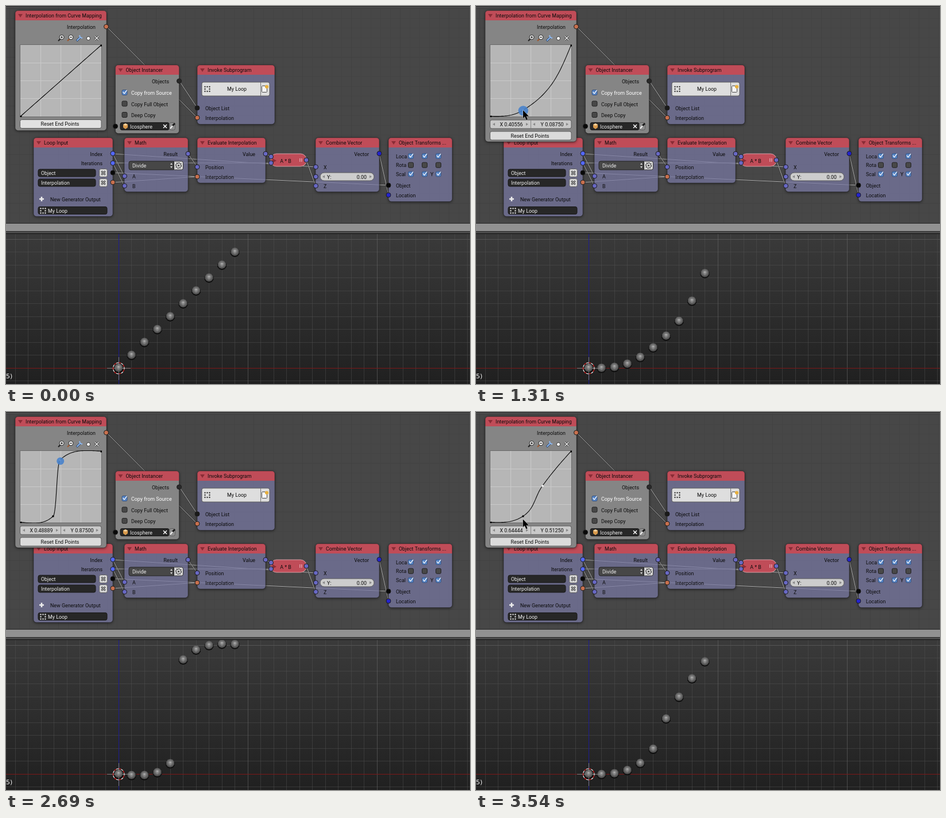
An HTML page with a canvas for the animation above (3580 ms loop, 808 by 660 pixels).

```html
<!DOCTYPE html>
<html lang="en">
<head>
<meta charset="utf-8">
<title>Curve driven loop</title>
<style>
html, body { margin: 0; width: 100%; height: 100%; overflow: hidden; background: #464646; }
canvas { display: block; width: 808px; height: 660px; }
</style>
</head>
<body>
<canvas id="stage" width="808" height="660"></canvas>
<script>
const ctx = document.getElementById('stage').getContext('2d');
const LOOP = 3580;
const FONT = '8.9px Roboto, sans-serif';
const RED = '#c04c58', GREY = '#858585', VIOLET = 'rgba(121,121,165,0.7)';
const ORANGE = '#c8704e', BLUE = '#5468fa', LILAC = '#6868c4', NAVY = '#2424cc', BLACK = '#080808';

// ---------- drawing helpers ----------
function text(s, x, y, color = '#0c0c0c', align = 'left', font = FONT) {
  ctx.font = font;
  ctx.textAlign = align;
  ctx.textBaseline = 'middle';
  ctx.fillStyle = color;
  ctx.fillText(s, x, y + 0.5);
}
function rect(x, y, w, h, color) {
  ctx.fillStyle = color;
  ctx.fillRect(x, y, w, h);
}
function box(x, y, w, h, r, fill, stroke) {
  ctx.beginPath();
  ctx.roundRect(x, y, w, h, r);
  if (fill) { ctx.fillStyle = fill; ctx.fill(); }
  if (stroke) { ctx.strokeStyle = stroke; ctx.lineWidth = 1; ctx.stroke(); }
}
function line(points, color, width = 1) {
  ctx.beginPath();
  points.forEach(([x, y]) => ctx.lineTo(x, y));
  ctx.strokeStyle = color;
  ctx.lineWidth = width;
  ctx.stroke();
}
function poly(points, color) {
  ctx.beginPath();
  points.forEach(([x, y]) => ctx.lineTo(x, y));
  ctx.closePath();
  ctx.fillStyle = color;
  ctx.fill();
}
function disc(x, y, r, fill, stroke) {
  ctx.beginPath();
  ctx.arc(x, y, r, 0, 7);
  ctx.fillStyle = fill;
  ctx.fill();
  if (stroke) { ctx.strokeStyle = stroke; ctx.lineWidth = 1; ctx.stroke(); }
}
function cross(x, y, r, color, width = 1.3) {
  line([[x - r, y - r], [x + r, y + r]], color, width);
  line([[x - r, y + r], [x + r, y - r]], color, width);
}
const socket = (x, y, color) => disc(x, y, 4, color, '#1c1c1c');
const arrow = (x, y, dir) => poly([[x - 2 * dir, y - 2.5], [x + 2 * dir, y], [x - 2 * dir, y + 2.5]], '#888');
const darkField = (x, y, w, h) => box(x, y, w, h, 3, '#272727', '#191919');
const lightField = (x, y, w, h, fill = '#dcdcdc') => box(x, y, w, h, 3, fill, '#5c5c5c');

function node(x, y, w, h, body, title) {
  // The shadow stays outside, so translucent bodies keep their colour.
  ctx.save();
  ctx.beginPath();
  ctx.rect(0, 0, 808, 380);
  ctx.roundRect(x, y, w, h, 5);
  ctx.clip('evenodd');
  ctx.shadowColor = 'rgba(0,0,0,0.6)';
  ctx.shadowBlur = 5;
  ctx.shadowOffsetY = 1;
  box(x, y, w, h, 5, '#000');
  ctx.restore();
  box(x, y, w, h, 5, body);
  box(x, y, w, 17, [5, 5, 0, 0], RED);
  box(x, y, w, h, 5, null, 'rgba(30,30,30,0.45)');
  poly([[x + 5, y + 6], [x + 13, y + 6], [x + 9, y + 12]], '#8a2c36');
  text(title, x + 18, y + 8.5);
}
function check(x, y, on) {
  box(x - 4.5, y - 4.5, 9, 9, 2, on ? '#5583c4' : '#484848', on ? '#38547f' : '#222');
  if (on) line([[x - 3, y - 1], [x - 0.5, y + 2], [x + 4, y - 4]], '#f0f4fa', 1.3);
}
function dots(x, y, color) {
  for (let i = 0; i < 9; i++) {
    if (i !== 4) disc(x - 4 + (i % 3) * 4, y - 4 + Math.floor(i / 3) * 4, 1.2, color);
  }
}

// ---------- timing ----------
const clamp = v => Math.min(1, Math.max(0, v));
const tick = (t, start) => start + Math.floor((t - start) / 40) * 40;
const mix = (a, b, u) => [a[0] + (b[0] - a[0]) * u, a[1] + (b[1] - a[1]) * u];
const snap = ([x, y]) => [Math.round(x * 180) / 180, Math.round(y * 160) / 160];
function ease(t, from, to) {
  const u = clamp((t - from) / (to - from));
  return u * u * (3 - 2 * u);
}

const LOW = [73 / 180, 14 / 160], HIGH = [87 / 180, 142 / 160], LEAD = 28;
function dragLow(t) { return mix([0.3167, 0.3167], LOW, ease(t, 640, 1120)); }
function dragUp(t) {
  const u = ease(t, 1900, 2440), bend = [0.575, 0.53];
  return mix(mix([0.767, 0.5], bend, u), mix(bend, HIGH, u), u);
}
function dragBack(t) { return mix(HIGH, [116 / 180, 81 / 160], ease(t, 2630, 3180)); }

function pose(t) {
  const s = { points: [[0, 0]], press: null, cursor: null };
  const press = (p, k = 0) => {
    s.press = { x: px(p[0]), y: py(p[1]), r: k ? 6.5 + 2.2 * k : 6.5, alpha: 0.88 * (1 - Math.max(0, k - 1) / 3) };
  };
  const release = (p, start) => {
    const k = Math.floor((t - start) / 40) + 1;
    if (k <= 3) press(p, k);
  };
  if (t >= 640) {
    const now = tick(t, 640);
    s.points.push(snap(dragLow(now)));
    if (t < 1310) press(dragLow(now + LEAD));
    else if (t < 1970) {
      release([LOW[0], 0.078], 1310);
      s.cursor = mix([82, 182], [133, 130], ease(tick(t, 1310), 1310, 1830));
    }
  }
  if (t >= 1970) {
    const drag = t < 2690 ? dragUp : dragBack;
    const now = tick(t, t < 2690 ? 1970 : 2690);
    if (t < 3220) {
      s.points.push(snap(drag(now)));
      press(drag(now + LEAD));
    } else {
      const end = [116 / 180, 82 / 160];
      s.points.push(end);
      release(end, 3220);
      s.cursor = mix([116, 128], [72, 204], ease(tick(t, 3220), 3220, 3680));
    }
  }
  s.points.push([1, 1]);
  return s;
}

// ---------- curve with automatic handles ----------
const px = v => 25.5 + 140 * v, py = v => 192.5 - 124 * v;
const sub = (a, b) => [a[0] - b[0], a[1] - b[1]];
const unit = v => { const l = Math.hypot(...v) || 1; return [v[0] / l, v[1] / l]; };
const along = (p, d, l) => [p[0] + d[0] * l, p[1] + d[1] * l];
const HANDLE = 2.5614;

function buildCurve(p) {
  const last = p.length - 1;
  const gap = i => Math.hypot(...sub(p[i + 1], p[i])) / HANDLE;
  const dir = p.map((q, i) => {
    const a = unit(sub(q, p[i - 1] || [0, 0])), b = unit(sub(p[i + 1] || [0, 0], q));
    return i === 0 ? b : i === last ? a : unit([a[0] + b[0], a[1] + b[1]]);
  });
  const before = p.map((q, i) => i ? along(q, dir[i], -gap(i - 1)) : q);
  const after = p.map((q, i) => i < last ? along(q, dir[i], gap(i)) : q);
  if (last > 1) {
    const a = [Math.max(0, before[1][0]), before[1][1]];
    const b = [Math.min(1, after[last - 1][0]), after[last - 1][1]];
    after[0] = along(p[0], unit(sub(a, p[0])), gap(0));
    before[last] = along(p[last], unit(sub(b, p[last])), gap(last - 1));
  }
  const out = [];
  for (let i = 0; i < last; i++) {
    const v1 = p[i], v4 = p[i + 1];
    const reach = Math.abs(after[i][0] - v1[0]) + Math.abs(v4[0] - before[i + 1][0]);
    const fit = Math.min(1, (v4[0] - v1[0]) / (reach || 1));
    const v2 = mix(v1, after[i], fit), v3 = mix(v4, before[i + 1], fit);
    for (let k = 0; k <= 32; k++) {
      const u = k / 32, m = mix(v2, v3, u);
      out.push(mix(mix(mix(v1, v2, u), m, u), mix(m, mix(v3, v4, u), u), u));
    }
  }
  return out;
}
function sample(curve, x) {
  const i = curve.findIndex(q => q[0] >= x);
  if (i < 1) return curve[0][1];
  const a = curve[i - 1], b = curve[i];
  return a[1] + (b[1] - a[1]) * (x - a[0]) / (b[0] - a[0] || 1);
}

// ---------- node editor ----------
function drawBackdrop() {
  rect(0, 0, 808, 380, '#474747');
  for (let i = 0; i < 48; i++) {
    const color = i % 5 ? '#444444' : '#414141';
    rect(6 + i * 17, 0, 1, 380, color);
    rect(0, 4 + i * 17, 808, 1, color);
  }
  rect(0, 0, 808, 1, '#202020');
  rect(0, 1, 808, 1, '#525252');
}
function drawLinks() {
  const link = (...c) => {
    const ends = [[c[0], c[1]], [c[2], c[3]]];
    line(ends, 'rgba(30,30,30,0.5)', 2.2);
    line(ends, '#b2b2b2', 1);
  };
  link(175, 36, 333, 195);
  link(302, 131, 333, 178);
  link(186, 258, 206, 297);
  link(186, 258, 539, 281);
  link(186, 274, 206, 314);
  link(186, 274, 461, 274);
  link(186, 291, 666, 313);
  link(186, 308, 333, 298);
  link(317, 258, 333, 281);
  link(452, 258, 461, 263);
  link(523, 269, 539, 314);
  link(650, 258, 666, 330);
}
function drawInstancer() {
  node(190.5, 103, 111, 119.5, GREY, 'Object Instancer');
  text('Objects', 284, 132, undefined, 'right');
  socket(301.5, 131, '#2a2a2a');
  ['Copy from Source', 'Copy Full Object', 'Deep Copy'].forEach((s, i) => {
    check(206.5, 151 + i * 19.5, i === 0);
    text(s, 218, 152 + i * 19.5, i ? undefined : '#fff');
  });
  darkField(199, 203.5, 85, 13);
  poly([[208, 205], [212, 207], [212, 212], [208, 215], [204, 212], [204, 207]], '#d99a4c');
  poly([[208, 205], [212, 207], [208, 209], [204, 207]], '#f4d3a0');
  text('Icosphere', 216, 210.5, '#eee');
  cross(277, 210, 3, '#fff', 1.5);
  lightField(284.5, 203.5, 10, 13, '#8e8e8e');
  line([[286, 214], [291, 208]], '#eee', 2);
  line([[290, 209], [294, 205]], '#181818', 3);
  socket(190.5, 210, BLACK);
}
function drawSubprogram() {
  node(333, 103, 135, 103.5, VIOLET, 'Invoke Subprogram');
  lightField(341, 133, 118, 24, '#dedede');
  line([[443.5, 133], [443.5, 157]], '#777');
  dots(350.5, 145, '#333');
  text('My Loop', 402, 145, undefined, 'center');
  box(445.5, 139.5, 9, 11, 1, '#f6f6f6', '#444');
  disc(454, 141, 3, '#e8b03c');
  text('Object List', 347, 179);
  text('Interpolation', 347, 196);
  socket(333, 178, '#1a1a1a');
  socket(333, 195, ORANGE);
}
function drawLoopInput() {
  node(48, 230, 138, 137.5, VIOLET, 'Loop Input');
  text('Index', 168, 259, undefined, 'right');
  text('Iterations', 168, 275, undefined, 'right');
  ['Object', 'Interpolation'].forEach((s, i) => {
    const y = 291.5 + i * 17;
    darkField(56, y - 6.5, 100, 13);
    text(s, 61, y + 0.5, '#eee');
    lightField(162.5, y - 7, 14, 14, '#d6d6d6');
    cross(169.5, y, 3.2, '#222', 2.6);
    cross(169.5, y, 3, '#fff', 1);
  });
  line([[58, 337], [66, 337]], '#eee', 2.5);
  line([[62, 333], [62, 341]], '#eee', 2.5);
  text('New Generator Output', 77, 338);
  darkField(56, 350.5, 120, 13);
  dots(64.5, 357.5, '#ddd');
  text('My Loop', 73, 358, '#eee');
  [BLUE, BLUE, BLACK, ORANGE].forEach((c, i) => socket(186, 257.5 + i * 16.8, c));
}
function drawMath() {
  node(206, 230, 111, 94.5, VIOLET, 'Math');
  text('Result', 299, 259, undefined, 'right');
  box(214, 271, 78, 15, [3, 0, 0, 3], '#474747', '#222');
  text('Divide', 220, 279, '#f0f0f0');
  poly([[286, 277], [290, 277], [288, 274]], '#ddd');
  poly([[286, 280], [290, 280], [288, 283]], '#ddd');
  box(292.5, 271, 16, 15, [0, 3, 3, 0], '#d6d6d6', '#333');
  ctx.setLineDash([2, 1.4]);
  ctx.beginPath();
  ctx.arc(300.5, 278.5, 4.5, 0, 7);
  ctx.strokeStyle = '#333';
  ctx.lineWidth = 2;
  ctx.stroke();
  ctx.setLineDash([]);
  disc(300.5, 278.5, 1.6, '#444');
  text('A', 220, 298);
  text('B', 220, 315);
  socket(317, 258, LILAC);
  socket(206.5, 297, LILAC);
  socket(206.5, 314, LILAC);
}
function drawEvaluate() {
  node(333, 230, 119, 79, VIOLET, 'Evaluate Interpolation');
  text('Value', 434, 259, undefined, 'right');
  text('Position', 347, 282);
  text('Interpolation', 347, 299);
  socket(452, 258, LILAC);
  socket(333, 281, LILAC);
  socket(333, 298, ORANGE);
}
function drawProduct() {
  box(461, 258, 62, 22, 10, RED, '#d8a0a6');
  poly([[464, 266], [464, 274], [471, 270]], '#8a2c36');
  text('A * B', 487, 270.5, undefined, 'center');
  rect(511, 266, 1.5, 6, '#e09aa2');
  rect(514, 266, 1.5, 6, '#e09aa2');
  socket(461.5, 263, LILAC);
  socket(461.5, 274, LILAC);
  socket(523, 269, LILAC);
}
function drawCombine() {
  node(539, 230, 111, 94.5, VIOLET, 'Combine Vector');
  text('Vector', 632, 259, undefined, 'right');
  text('X', 553, 282);
  box(547, 291, 94, 14, 7, '#cdcdcd', '#5c5c5c');
  arrow(553, 298, -1);
  arrow(635, 298, 1);
  text('Y:', 559, 298.5);
  text('0.00', 628, 298.5, undefined, 'right');
  text('Z', 553, 315);
  socket(650, 257.5, NAVY);
  [281, 298, 314].forEach(y => socket(539.5, y, LILAC));
}
function drawTransforms() {
  node(666, 230, 111, 111.5, VIOLET, 'Object Transforms ...');
  ['Loca', 'Rota', 'Scal'].forEach((s, row) => {
    const y = 262 + row * 15.7;
    text(s, 679, y + 0.5);
    [705, 729, 753].forEach(x => check(x, y, row !== 1));
  });
  text('Y', 739, 294);
  text('Object', 679, 314);
  text('Location', 679, 331);
  socket(666, 313, BLACK);
  socket(666, 330, NAVY);
}
function drawCurveNode(t, state, curve) {
  const open = state.points.length > 2;
  node(16, 8, 159, open ? 229 : 209.5, GREY, 'Interpolation from Curve Mapping');
  text('Interpolation', 156, 37, undefined, 'right');
  socket(174.5, 36, ORANGE);

  [96, 112].forEach((x, i) => {
    line([[x - 1, 57], [x - 5, 61]], i ? '#a05a30' : '#222', 2.2);
    disc(x + 1, 54.5, 4, '#eee', '#222');
    line([[x - 1, 54.5], [x + 3, 54.5]], '#222', 1.2);
    if (!i) line([[x + 1, 52.5], [x + 1, 56.5]], '#222', 1.2);
  });
  line([[123, 61], [130, 54]], '#22406c', 3.6);
  line([[123.5, 60.5], [130, 54]], '#8fb8ee', 2);
  line([[128, 51], [129, 55], [133, 56]], '#8fb8ee', 2);
  disc(143.5, 56.5, 3.2, '#f2f2f2', '#333');
  cross(158, 56, 3.5, '#222', 3);
  cross(158, 56, 3.5, '#f4f4f4', 1.4);

  rect(25, 68, 141, 125, '#b6b6b6');
  for (let i = 1; i < 4; i++) {
    rect(25 + i * 35, 68, 1, 125, '#cacaca');
    rect(25, 68 + i * 31, 141, 1, '#cacaca');
  }
  box(24.5, 67.5, 142, 126, 0, null, '#6a6a6a');
  ctx.save();
  ctx.beginPath();
  ctx.rect(24, 67, 143, 127);
  ctx.clip();
  line(curve.map(([x, y]) => [px(x), py(y)]), '#050505', 1.1);
  state.points.forEach(([x, y], i) => {
    const active = open && i === state.points.length - 2;
    rect(Math.round(px(x)) - 1.5, Math.round(py(y)) - 1.5, 3, 3, active ? '#fff' : '#000');
  });
  ctx.restore();

  if (open) {
    const [x, y] = state.points[state.points.length - 2];
    lightField(24.5, 199, 141.5, 15, '#c9c9c9');
    line([[95.5, 199], [95.5, 214]], '#858585');
    [[31, -1], [89, 1], [101, -1], [159, 1]].forEach(([ax, d]) => arrow(ax, 206.5, d));
    text('X ' + x.toFixed(5), 61.5, 206.5, undefined, 'center');
    text('Y ' + y.toFixed(5), 132.5, 206.5, undefined, 'center');
  }
  const top = open ? 219 : 198.5;
  lightField(24.5, top, 141.5, 15, t < 230 ? '#e1e1e1' : t < 270 ? '#dedede' : '#dbdbdb');
  text('Reset End Points', 94, top + 7.5, undefined, 'center');
}
function drawPointer({ press, cursor }) {
  if (press) {
    ctx.globalAlpha = press.alpha;
    disc(press.x, press.y, press.r, '#4681cc');
    ctx.globalAlpha = 1;
  }
  if (cursor) {
    const shape = [[0, 0], [0, 14], [3, 11], [5.5, 17], [8, 16], [5.5, 10.5], [10, 10.5]]
      .map(([x, y]) => [cursor[0] + x, cursor[1] + y]);
    line([...shape, shape[0]], 'rgba(240,240,240,0.7)', 1);
    poly(shape, '#000');
  }
}

// ---------- 3D view ----------
function drawBall(x, y) {
  const ring = (r, dx = 0, dy = 0) => Array.from({ length: 10 }, (_, i) => {
    const a = i * Math.PI / 5 + Math.PI / 10;
    return [x + dx + r * Math.cos(a), y + dy + r * Math.sin(a)];
  });
  poly(ring(8.3, 0, 0.6), '#0c0c0c');
  const shade = ctx.createRadialGradient(x, y - 2, 1, x, y - 1, 8.5);
  shade.addColorStop(0, '#8c8c8c');
  shade.addColorStop(0.55, '#646464');
  shade.addColorStop(1, '#3c3c3c');
  poly(ring(7.5, 0, -0.5), shade);
  poly([[x - 4, y - 3], [x + 4, y - 3], [x, y + 4]], 'rgba(150,150,150,0.45)');
  poly([[x - 1.5, y - 3], [x + 1.5, y - 3], [x, y]], '#b4b4b4');
}
function drawView(curve) {
  rect(0, 379, 808, 1, '#2a2a2a');
  rect(0, 380, 808, 13, '#919191');
  rect(0, 393, 808, 1, '#2c2c2c');
  rect(0, 394, 808, 3, '#4c4c4c');
  rect(0, 397, 808, 1, '#101010');
  const shade = ctx.createLinearGradient(0, 398, 0, 660);
  shade.addColorStop(0, '#3a3a3a');
  shade.addColorStop(1, '#202020');
  rect(0, 398, 808, 262, shade);

  ctx.save();
  ctx.beginPath();
  ctx.rect(0, 398, 808, 262);
  ctx.clip();
  for (let i = -10; i < 30; i++) {
    const color = i % 10 ? 'rgba(84,84,84,0.45)' : 'rgba(104,104,104,0.6)';
    rect(Math.floor(196 + i * 22.5), 398, 1, 262, color);
    rect(0, Math.floor(632 - i * 22.5), 808, 1, color);
  }
  rect(0, 632, 808, 1, '#7c1818');
  rect(196, 398, 1, 262, '#1c1c94');
  for (let i = 9; i >= 0; i--) drawBall(196 + i * 22.5, 632 - 225 * sample(curve, i / 10));

  [[176, 632, 15, 1], [202, 632, 15, 1], [196, 613, 1, 14], [196, 638, 1, 15]]
    .forEach(a => rect(...a, 'rgba(150,150,150,0.75)'));
  const dash = Math.PI / 7;
  for (let i = 0; i < 14; i++) {
    ctx.beginPath();
    ctx.arc(196.2, 632.5, 9.7, i * dash - Math.PI / 2, (i + 1) * dash - Math.PI / 2);
    ctx.strokeStyle = i % 2 ? '#fff' : '#f01818';
    ctx.lineWidth = 1.1;
    ctx.stroke();
  }
  text('5)', 0, 646.5, '#f4f4f4', 'left', '11px "DejaVu Sans", sans-serif');
  ctx.restore();
}

function draw(t) {
  const state = pose(t), curve = buildCurve(state.points);
  drawBackdrop();
  drawLinks();
  drawInstancer();
  drawSubprogram();
  drawLoopInput();
  drawMath();
  drawEvaluate();
  drawProduct();
  drawCombine();
  drawTransforms();
  drawCurveNode(t, state, curve);
  drawPointer(state);
  drawView(curve);
}

const began = performance.now();
function frame() {
  draw((performance.now() - began) % LOOP);
  requestAnimationFrame(frame);
}
frame();
</script>
</body>
</html>
```
